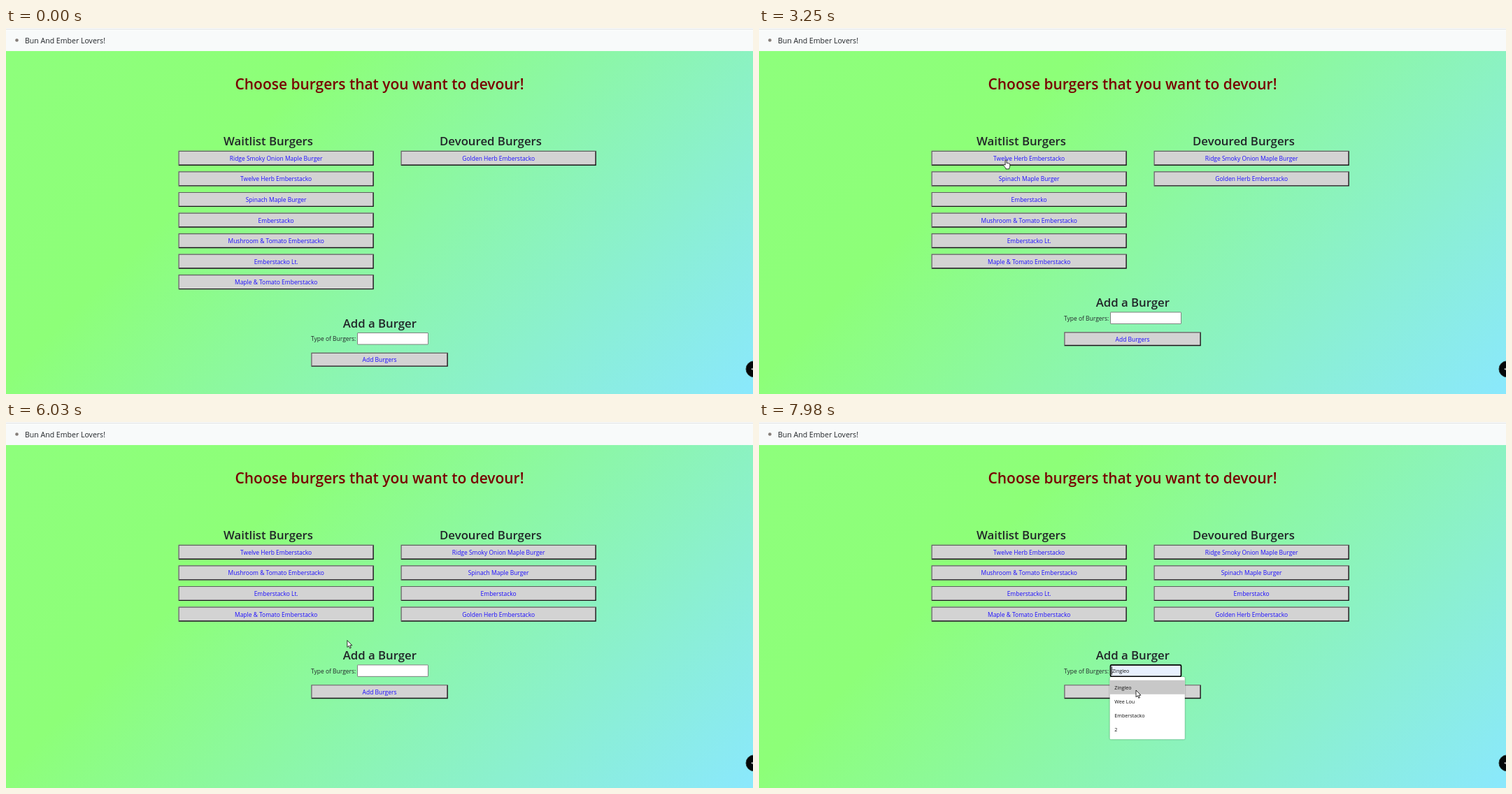
Recreate the animation shown at these times as an HTML page. Size 1068x524 px, loop 8 s.

```html
<!DOCTYPE html>
<html lang="en">
<head>
<meta charset="utf-8">
<title>Burger list</title>
<style>
  html, body { margin: 0; width: 100%; height: 100%; overflow: hidden; }
  svg { display: block; width: 1068px; height: 524px; font: 8.47px "Open Sans", "Noto Sans", sans-serif;
    background: linear-gradient(135deg, #8eff7c, #8dff78 30%, #8ae8fd) 0 33px / 1068px 491px no-repeat; }
  text { fill: #212529; white-space: pre; }
  .mid { text-anchor: middle; }
  .head { font-size: 16.75px; font-weight: 600; }
  .title { font-size: 20.95px; font-weight: 600; fill: #780000; }
  .brand { font-size: 10.55px; }
  .small { font-size: 7.17px; fill: #111; }
  .link { fill: #1c0cff; }
  .menu { filter: drop-shadow(0 .7px 1px #0006); }
</style>
</head>
<body>
<svg viewBox="0 0 1068 524">
  <rect width="1068" height="33" fill="#f8fafa"/>
  <rect width="1068" height="1" fill="#fff"/>
  <rect y="1" width="1068" height="1" fill="#dfe1e2"/>
  <circle cx="15.5" cy="17.5" r="2.3" fill="#857d78"/>
  <text class="brand" x="27" y="21.7">Bun And Ember Lovers!</text>
  <text class="mid title" x="534" y="87.5">Choose burgers that you want to devour!</text>
  <text class="mid head" x="375" y="167.8">Waitlist Burgers</text>
  <text class="mid head" x="693" y="167.8">Devoured Burgers</text>
  <g id="page"></g>
  <circle cx="1069.5" cy="488.3" r="11.5" fill="#050808" stroke="#2b3a38"/>
  <path d="M1069 488.3H1066M1067.5 486.8L1066 488.3L1067.5 489.8" fill="none" stroke="#fff" stroke-width=".8"/>
  <g id="pointer"></g>
</svg>
<script>
const LOOP = 8000, PITCH = 29.55, TOP = 175.8;
const page = document.getElementById('page');
const pointer = document.getElementById('pointer');

// name and the time it is devoured
const burgers = [
  ['Ridge Smoky Onion Maple Burger', 2440],
  ['Twelve Herb Emberstacko', Infinity],
  ['Spinach Maple Burger', 3910],
  ['Emberstacko', 5550],
  ['Mushroom &amp; Tomato Emberstacko', Infinity],
  ['Emberstacko Lt.', Infinity],
  ['Maple &amp; Tomato Emberstacko', Infinity],
  ['Golden Herb Emberstacko', 0],
];
const suggestions = ['Zingleo', 'Wee Lou', 'Emberstacko', '2'];

// press time, time the page is busy, time it reloads, row
const clicks = [[2160, 2290, 2440, 0], [3690, 3760, 3910, 1], [5270, 5370, 5550, 1]];
const FOCUS = 6570, BLINK = 530;

// time, x, y of the pointer
const path = [
  [200, 1039, 527], [850, 351, 212], [890, 351, 212], [1010, 348, 197], [1290, 348, 180],
  [1610, 348, 180], [1790, 351, 181], [3120, 351, 181], [3540, 360, 216],
  [4320, 360, 216], [4500, 363, 221.5], [4720, 363, 221.5], [4950, 367, 214],
  [5550, 367, 214], [6310, 541, 356], [6330, 541, 356], [6500, 542, 358],
  [7440, 542, 358], [7650, 541, 393], [7890, 541, 393], [7980, 539, 384],
];

const shapes = {
  arrow: '<path d="M0 0V9.8L2.3 7.8 3.8 11.3 5.4 10.6 3.9 7.2H7Z" fill="#fff" stroke="#000" stroke-width=".8"/>',
  hand: '<path d="M-1 7V.8a1 1 0 0 1 2 0V4.3q1-.4 1.7.2 1-.2 1.6.5 1.2-.1 1.4 1V8.5q0 1.8-1.1 3V12.8H-.2V11.6L-3.5 7.8q-.3-1.3 1-1.3Z" fill="#fff" stroke="#000" stroke-width=".8"/>',
  beam: '<path d="M-1.8-4.5H1.8M0-4.5V4.5M-1.8 4.5H1.8" fill="none" stroke="#000" stroke-width=".8"/>',
};

const box = (x, y, w, h, attrs) => `<rect x="${x}" y="${y}" width="${w}" height="${h}" ${attrs}/>`;
const text = (cls, x, y, s) => `<text class="${cls}" x="${x}" y="${y}">${s}</text>`;
const ring = 'rx="1.5" stroke="#000" stroke-width="1.7"';

function button(x, y, w, h, label, focused) {
  const r = x + w, b = y + h;
  const frame = focused
    ? box(x + .9, y + .9, w - 1.8, h - 1.8, `fill="#d3d3d3" ${ring}`)
    : box(x, y, w, h, 'fill="#d3d3d3"') +
      `<path d="M${x} ${b}V${y}H${r}l-1.4 1.2H${x + 1.2}V${b - 1.4}Z" fill="#5c5f5c"/>` +
      `<path d="M${x} ${b}H${r}V${y}l-1.4 1.2V${b - 1.4}H${x + 1.2}Z" fill="#151515"/>`;
  return frame + text('mid link', x + w / 2, y + h / 2 + 3.5, label);
}

function pointerAt(t) {
  const i = path.findIndex(p => p[0] > t);
  if (i < 0) return path.at(-1).slice(1);
  if (!i) return path[0].slice(1);
  const [a, b] = [path[i - 1], path[i]];
  const u = (t - a[0]) / (b[0] - a[0]), k = u * u * (3 - 2 * u);
  return [a[1] + (b[1] - a[1]) * k, a[2] + (b[2] - a[2]) * k];
}

function draw(t) {
  const [px, py] = pointerAt(t);
  const over = (x, y, w, h) => px >= x && px < x + w && py >= y && py < y + h;
  const click = clicks.find(c => t >= c[0] && t < c[2]);
  const waiting = burgers.filter(b => t < b[1]);
  const devoured = burgers.filter(b => t >= b[1]);
  const open = t >= FOCUS;
  let cursor = 'arrow', out = '';

  const addButton = (x, y, w, h, label, focused) => {
    if (!open && over(x, y, w, h)) cursor = 'hand';
    out += button(x, y, w, h, label, focused);
  };
  waiting.forEach((b, i) => addButton(246.5, TOP + i * PITCH, 279.3, 21.2, b[0], click && click[3] === i));
  devoured.forEach((b, i) => addButton(564.5, TOP + i * PITCH, 279.3, 21.2, b[0]));

  // the form follows the longer list
  const dy = (waiting.length - 7) * PITCH, inputY = 436.5 + dy;
  out += text('mid head', 534.3, 428.8 + dy, 'Add a Burger');
  out += text('', 436, 448.2 + dy, 'Type of Burgers:');
  addButton(436.3, 464.8 + dy, 195.5, 20, 'Add Burgers');
  if (over(502, inputY, 102, 17)) cursor = 'beam';

  const row = open && py > 369.7 ? Math.floor((py - 369.7) / 20.1) : -1;
  out += box(502.5, inputY, 101, 16.5, `fill="${row < 0 ? '#fff' : '#e8f0fe'}" ` +
    (open ? ring : 'rx=".5" stroke="#767676" stroke-width=".9"'));
  if (row >= 0) out += text('small', 505, inputY + 11.3, suggestions[row]);
  if (open) {
    if (Math.floor((t - FOCUS) / BLINK) % 2 === 0) out += box(504.2, inputY + 2.4, .8, 11.5, 'fill="#000"');
    out += `<g opacity="${Math.min(1, (t - FOCUS) / 80)}">` +
      box(501.6, 365, 107.2, 89.3, 'rx="1.5" fill="#fff" class="menu"');
    if (row >= 0) out += box(501.6, 369.7 + row * 20.1, 107.2, 20.1, 'fill="#c8c8c8"');
    suggestions.forEach((s, i) => out += text('small', 508.3, 382.5 + i * 20.1, s));
    out += '</g>';
  }

  if (click && t >= click[1]) cursor = 'arrow';
  if (page.innerState !== out) page.innerHTML = page.innerState = out;
  pointer.innerHTML = t < 220 ? '' : shapes[cursor];
  pointer.setAttribute('transform', `translate(${px} ${py})`);
}

function tick() {
  draw(performance.now() % LOOP);
  requestAnimationFrame(tick);
}
tick();
</script>
</body>
</html>
```
